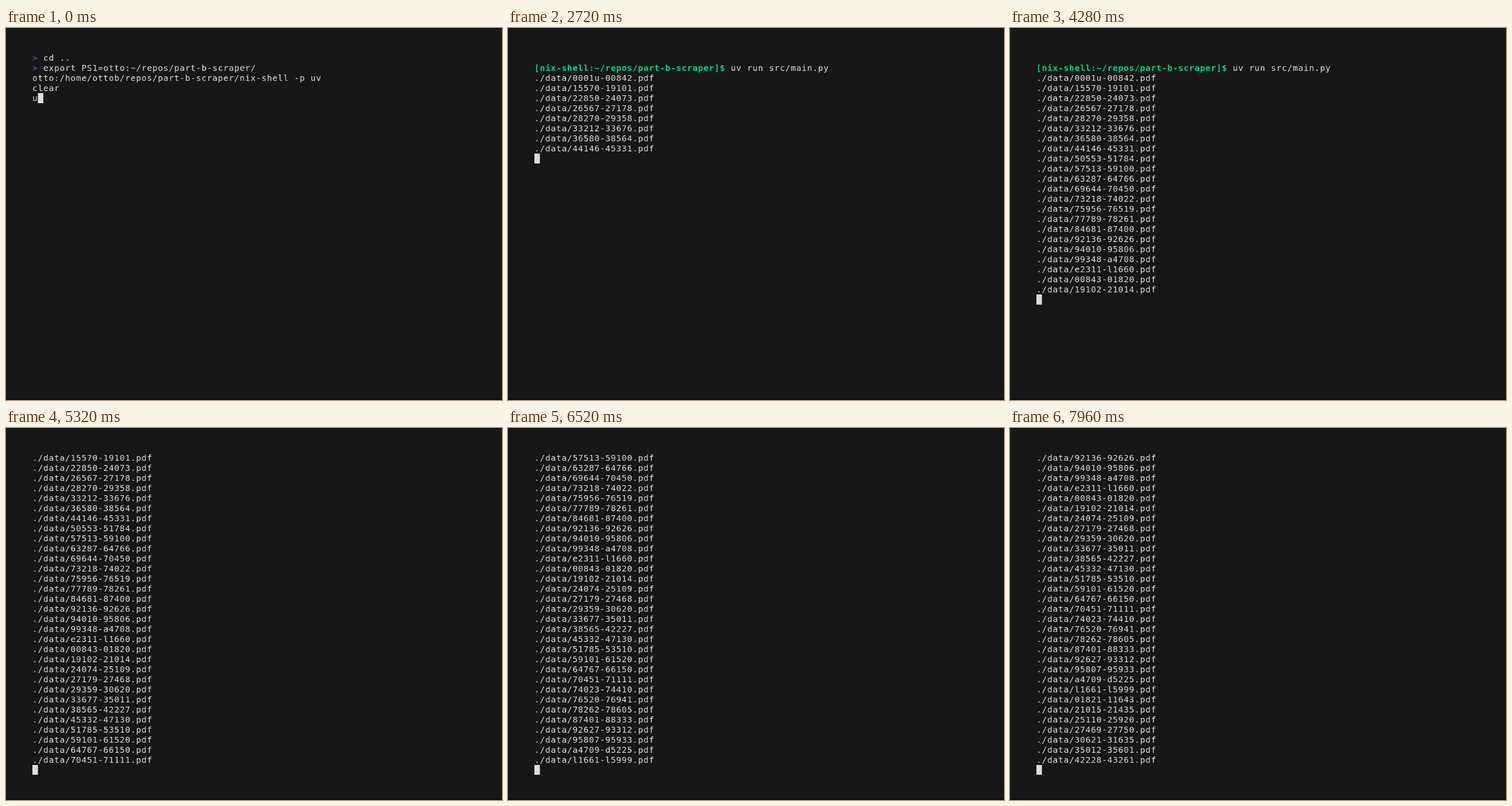
Recreate the animation shown at these times as an HTML page with a canvas. Size 864 by 648 pixels, loop 8000 ms.

```html
<!DOCTYPE html>
<html lang="en">
<head>
<meta charset="utf-8">
<title>Terminal session</title>
<style>
  html, body { margin: 0; width: 100%; height: 100%; overflow: hidden; background: #171717; }
  canvas { display: block; }
</style>
</head>
<body>
<canvas id="screen" width="864" height="648"></canvas>
<script>
const screenCtx = document.getElementById('screen').getContext('2d');

const LOOP = 8000, TICK = 40;
const LEFT = 46, TOP = 43.2, SCALE = 0.7308;
const COLS = 60, ROWS = 32, CELL_W = 13, CELL_H = 24, BASELINE = 19;
const BG = '#171717', FG = '#dddddd', GREEN = '#00d787', VIOLET = '#5a56e0';

const TYPED_AT = 440, ENTER_AT = 680, CLEAR_AT = 760, RUN_AT = 840;
const BLINK_ON = 240, BLINK_OFF = 200;

const COMMAND = 'uv run src/main.py';
const PROMPT = '[nix-shell:~/repos/part-b-scraper]$ ';

// The terminal is drawn on whole pixels, then scaled down smoothly
const terminal = document.createElement('canvas');
terminal.width = COLS * CELL_W;
terminal.height = ROWS * CELL_H;
const ctx = terminal.getContext('2d');

// Files come in passes over these ranges; each pass goes on where the last one ended
const STARTS = `0001u 15570 22850 26567 28270 33212 36580 44146 50553 57513
  63287 69644 73218 75956 77789 84681 92136 94010 99348 e2311`.split(/\s+/);
const ENDS = `00842 19101 24073 27178 29358 33676 38564 45331 51784 59100
  64766 70450 74022 76519 78261 87400 92626 95806 a4708 l1660
  01820 21014 25109 27468 30620 35011 42227 47130 53510 61520
  66150 71111 74410 76941 78605 88333 93312 95933 d5225 l5999
  11643 21435 25920 27750 31635 35601 43261`.split(/\s+/);
const after = id => id[0] + String(+id.slice(1) + 1).padStart(4, '0');
const files = ENDS.map((end, i) =>
  `./data/${STARTS[i] ?? after(ENDS[i - STARTS.length])}-${end}.pdf`);

// Output pace: [time, lines printed by then], even in between
const PACE = [[1440, 1], [1800, 4], [2360, 5], [2920, 10], [4480, 24],
  [5320, 32], [5920, 37], [6680, 42], [7240, 43], [7960, 47]];

function printTime(line) {
  const i = Math.max(1, PACE.findIndex(([, count]) => count >= line));
  const [t0, n0] = PACE[i - 1], [t1, n1] = PACE[i];
  return Math.ceil((t0 + (t1 - t0) * (line - n0) / (n1 - n0)) / TICK) * TICK;
}
const printTimes = files.map((_, i) => printTime(i + 1));
const cursorMoves = [TYPED_AT, ENTER_AT, CLEAR_AT, RUN_AT, ...printTimes];

const span = (text, color = FG, bold = false) => ({ text, color, bold });

// Every row is a list of spans; the cursor sits at the end of the last row
function rowsAt(t) {
  if (t < CLEAR_AT) {
    const typed = 1 + Math.floor(Math.min(t / TYPED_AT, 1) * (COMMAND.length - 1));
    const rows = [
      [span('>', VIOLET), span(' cd ..')],
      [span('>', VIOLET), span(' export PS1=otto:~/repos/part-b-scraper/')],
      [span('otto:/home/ottob/repos/part-b-scraper/nix-shell -p uv')],
      [span('clear')],
      [span(COMMAND.slice(0, typed))]
    ];
    return t < ENTER_AT ? rows : [...rows, []];
  }
  const prompt = span(PROMPT, GREEN, true);
  if (t < RUN_AT) return [[], [prompt]];
  const output = files.filter((_, i) => printTimes[i] <= t).map(name => [span(name)]);
  return [[], [prompt, span(COMMAND)], ...output, []].slice(-ROWS);
}

function cursorVisible(t) {
  const lastMove = cursorMoves.findLast(time => time <= t) ?? t;
  return (t - lastMove) % (BLINK_ON + BLINK_OFF) < BLINK_ON;
}

function drawRow(spans, row) {
  let col = 0;
  for (const { text, color, bold } of spans) {
    ctx.fillStyle = color;
    ctx.font = `${bold ? 'bold ' : ''}20px "DejaVu Sans Mono", monospace`;
    for (const char of text) ctx.fillText(char, col++ * CELL_W, row * CELL_H + BASELINE);
  }
  return col;
}

function draw(t) {
  ctx.fillStyle = BG;
  ctx.fillRect(0, 0, terminal.width, terminal.height);
  const rows = rowsAt(t);
  const cursorCol = rows.map(drawRow).at(-1);
  if (cursorVisible(t)) {
    ctx.fillStyle = FG;
    ctx.fillRect(cursorCol * CELL_W, (rows.length - 1) * CELL_H, CELL_W, CELL_H);
  }

  screenCtx.fillStyle = BG;
  screenCtx.fillRect(0, 0, 864, 648);
  screenCtx.fillStyle = '#130c10';
  screenCtx.fillRect(0, 645, 864, 3);
  screenCtx.drawImage(terminal, LEFT, TOP, terminal.width * SCALE, terminal.height * SCALE);
}

const start = performance.now();
function frame() {
  const t = (performance.now() - start) % LOOP;
  draw(Math.floor(t / TICK) * TICK);
  requestAnimationFrame(frame);
}
frame();
</script>
</body>
</html>
```
